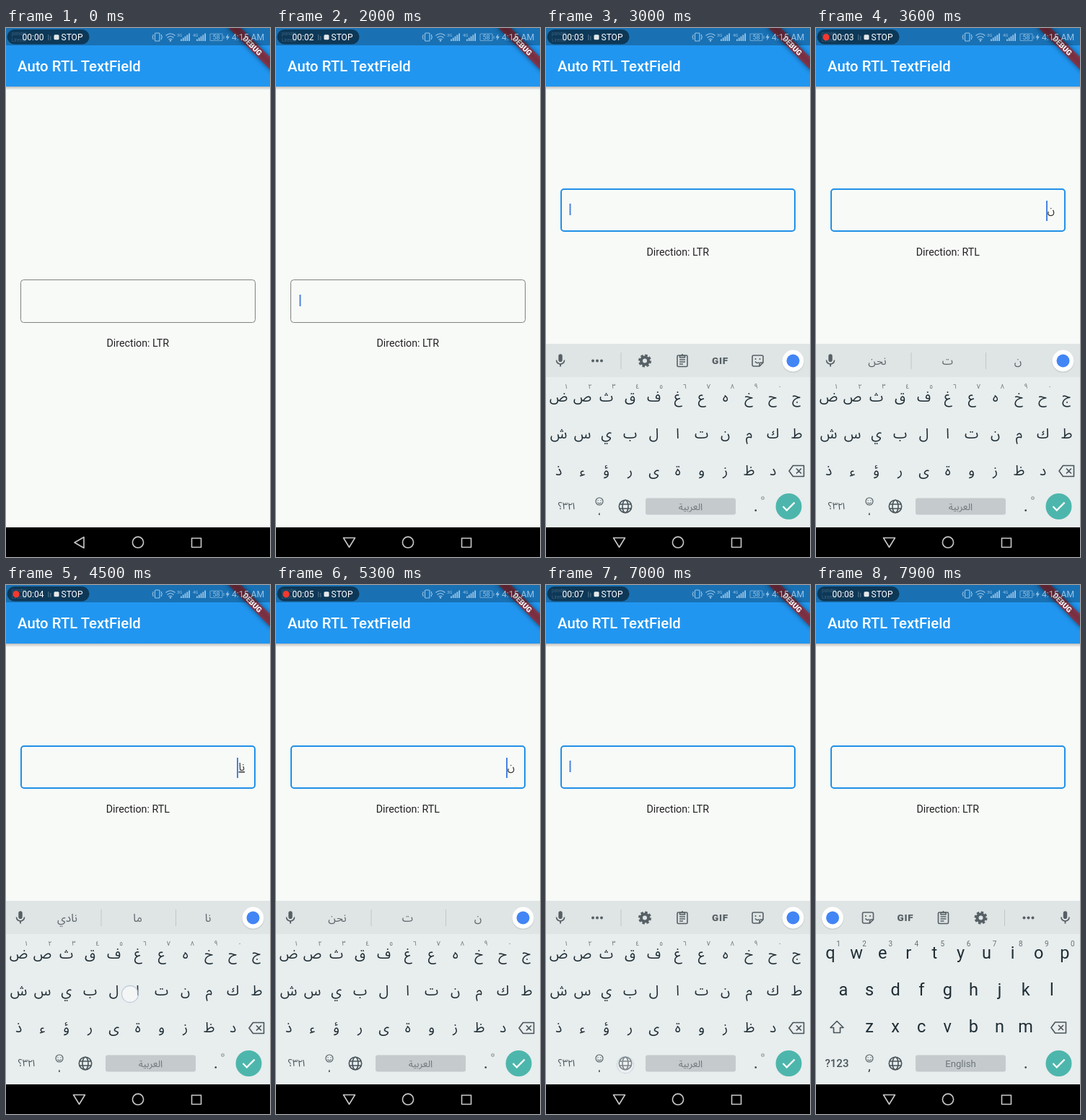
An HTML page for the animation above (8 s loop, 366 px wide and 732 px high).

```html
<!DOCTYPE html>
<html lang="en">
<head>
<meta charset="utf-8">
<title>Auto RTL TextField</title>
<style>
  html, body { margin: 0; width: 100%; height: 100%; overflow: hidden; background: #f8faf8; }
  svg { display: block; width: 100%; height: 100%; }
  text { font-family: Roboto, "Noto Sans Arabic", "DejaVu Sans", sans-serif; }
  .mid { text-anchor: middle; }
  .line { fill: none; stroke: currentColor; stroke-width: 1.6; stroke-linejoin: round; }
  .thin { stroke-width: 1.1; }
</style>
</head>
<body>
<svg viewBox="0 0 366 732">
  <defs>
    <filter id="blur" x="-30%" y="-200%" width="160%" height="500%"><feGaussianBlur stdDeviation="3.5"/></filter>
    <linearGradient id="shade" x2="0" y2="1">
      <stop stop-color="#000" stop-opacity=".24"/><stop offset="1" stop-color="#000" stop-opacity="0"/>
    </linearGradient>
  </defs>
  <rect width="366" height="732" fill="#f8faf8"/>

  <g id="form">
    <rect id="border" rx="4" fill="none"/>
    <text id="typed" x="331" y="383" font-size="15" text-anchor="end" text-decoration="underline" fill="#333"></text>
    <rect id="caret" width="2" fill="#4a82e0"/>
    <text id="direction" class="mid" x="182.8" y="441.4" font-size="14.25" fill="#212121"></text>
  </g>

  <g id="keyboard">
    <rect y="437" width="366" height="254" fill="#e8eded"/>
    <rect y="437" width="366" height="46" fill="#dfe4e4"/>
    <g id="strip" color="#566065"></g>
    <g id="keys" color="#47545a"></g>
    <rect x="138" y="650.5" width="125" height="23" rx="3" fill="#c5cacd"/>
    <text id="language" class="mid" x="200.5" y="666.6" font-size="13.2" fill="#6d767b"></text>
    <g color="#47545a">
      <g class="line">
        <circle cx="110" cy="662" r="8.7"/><ellipse cx="110" cy="662" rx="4" ry="8.7"/>
        <path d="M102 659H118M102 665H118"/>
      </g>
      <g class="line thin">
        <circle cx="74" cy="655" r="5"/><path d="M71.4 656.5Q74 659.5 76.6 656.5M72 653.2v1M76 653.2v1"/>
      </g>
    </g>
    <circle cx="290.7" cy="667.5" r="1.3" fill="#26343b"/>
    <circle cx="336.5" cy="662" r="18" fill="#4db6ac"/>
    <path d="M328.5 662l5.3 5.4 10.8-10.8" fill="none" stroke="#fff" stroke-width="2.2"/>
  </g>

  <circle id="touch" r="11.5" fill="#fff" fill-opacity=".65" stroke="#b4c3d8" stroke-width="1.3"/>

  <rect y="81" width="366" height="5" fill="url(#shade)"/>
  <rect width="366" height="81" fill="#2196f0"/>
  <text x="16" y="60" font-size="20.3" font-weight="500" fill="#fff">Auto RTL TextField</text>
  <g transform="translate(366 0) rotate(45) scale(1.0167)">
    <rect x="-44" y="28" width="88" height="12" opacity=".5" filter="url(#blur)"/>
    <rect x="-44" y="28" width="88" height="12" fill="#b71c1c" fill-opacity=".63"/>
    <text class="mid" y="37.7" font-size="10.2" font-weight="900" fill="#fff">DEBUG</text>
  </g>

  <rect width="366" height="24" opacity=".25"/>
  <g color="#bcd9f0" fill="#bcd9f0" opacity=".8">
    <g class="line thin">
      <rect x="206.5" y="7" width="6.5" height="11" rx="1"/>
      <path d="M204 9v2l-1 1.5 1 1.5v2M215.5 9v2l1 1.5-1 1.5v2"/>
      <path d="M221.5 10.5Q228 5 234.5 10.5M223.5 13.5Q228 9.5 232.5 13.5M225.5 16Q228 14 230.5 16"/>
      <g opacity=".65"><rect x="283" y="8" width="17" height="9.5" rx="1"/><path d="M302 11v4"/></g>
    </g>
    <circle cx="228" cy="17.5" r="1.2"/>
    <g id="signals"></g>
    <text x="286.5" y="16" font-size="9">58</text>
    <path d="M308 8l-3.5 5.5h2.3l-.8 4 3.8-5.7h-2.4z"/>
    <text x="313" y="17" font-size="12.2">4:15 AM</text>
  </g>
  <rect x="1.5" y="2" width="114" height="20.5" rx="10.2" fill="#0c3350" fill-opacity=".92"/>
  <g font-size="6.5" fill="#8aa3b8" opacity=".4">
    <text x="8" y="10">ponder</text><text x="8" y="19">Lirento</text>
    <path d="M58 9h1.5v8H58zM61 11h1.5v6H61z"/>
  </g>
  <circle id="record" cx="14" cy="12.7" r="4.7" fill="#f3392f"/>
  <text id="clock" x="22.5" y="17" font-size="12" fill="#fff"></text>
  <rect x="66.5" y="9.3" width="7" height="7" rx="1.5" fill="#e4e8ea"/>
  <text x="76.5" y="17" font-size="12" fill="#fff">STOP</text>

  <rect y="691" width="366" height="41"/>
  <g class="line" color="#c8c8c8">
    <path id="back"/><circle cx="183" cy="711.7" r="7.6"/><rect x="257.5" y="706" width="13" height="12.5"/>
  </g>
</svg>

<script>
const $ = id => document.getElementById(id);
const LOOP = 8000;
const time = { caret: 1750, slide: 2030, focus: 2050, lift: 2270, firstKey: 3270, secondKey: 4270,
               firstDelete: 5050, secondDelete: 5950, english: 7180 };

const label = (s, x, y, size, fill = '#1f2e36', extra = '') =>
  `<text class="mid" x="${x}" y="${y}" font-size="${size}" fill="${fill}" ${extra}>${s}</text>`;
const at = (x, y, body) => `<g transform="translate(${x} ${y})">${body}</g>`;
const divider = x => `<path d="M${x} 449v23" stroke="#c1c7c9"/>`;

const icons = {
  mic: `<path transform="translate(-10.8 -11) scale(.9)" fill="currentColor" d="M12 14c1.66 0 3-1.34 3-3V5a3 3 0 0 0-6 0v6c0 1.66 1.34 3 3 3zm5.3-3a5.3 5.3 0 0 1-10.6 0H5a7 7 0 0 0 6 6.92V21h2v-3.08A7 7 0 0 0 19 11z"/>`,
  dots: [-6, 0, 6].map(x => `<circle cx="${x}" r="2" fill="currentColor"/>`).join(''),
  gear: `<g fill="none" stroke="currentColor"><circle r="5" stroke-width="4"/>
    <circle r="7.5" stroke-width="3" stroke-dasharray="3.4 2.49"/></g>`,
  clipboard: `<g class="line"><rect x="-7" y="-7.5" width="14" height="15.5" rx="1.5"/>
    <path d="M-3.5-7h7v2.5h-7zM0-9.5v2M-4-1.5h8M-4 1.5h8M-4 4.5h5"/></g>`,
  gif: label('GIF', 0, 4.5, 13.5, 'currentColor', 'font-weight="900" letter-spacing=".8"'),
  sticker: `<path class="line" d="M-5.5-7.5h11a2 2 0 0 1 2 2v8l-5 5h-8a2 2 0 0 1-2-2v-11a2 2 0 0 1 2-2zM7.5 2.5h-3a2 2 0 0 0-2 2v3M-3.5 1Q-1 4.5 2 2M-3-3.5v2M3-3.5v2"/>`,
  search: `<circle cy="1" r="15.5" fill="#b8bec0" opacity=".5"/><circle r="15" fill="#fff"/><circle r="9" fill="#4285f4"/>`,
  backspace: `<path class="line" d="M-4.5-7.5H10.5v15H-4.5L-10 0zM0-3.5l7 7M7-3.5l-7 7"/>`,
  shift: `<path class="line" d="M0-8.5L9 .5H4.5v7h-9v-7H-9z"/>`,
};

function toolbar(flip) {
  const place = x => flip ? 365.5 - x : x;
  const slots = [['mic', 20], ['dots', 71], ['gear', 137], ['clipboard', 189],
                 ['gif', 241.5], ['sticker', 293.5], ['search', 342.5]];
  return divider(place(104)) + slots.map(([name, x]) => at(place(x), 460.5, icons[name])).join('');
}

function suggestions(words) {
  return at(20, 460.5, icons.mic) + at(342.5, 460.5, icons.search) + divider(132) + divider(235.5) +
    words.map((w, i) => label(w, 85 + 97.5 * i, 465.5, 15.5, '#5c676c')).join('');
}

const row = (letters, x, step, y, size, extra) =>
  [...letters].map((c, i) => label(c, x + step * i, y, size, undefined, extra)).join('');
const arabicRow = (letters, y) => row(letters, 17.6, 33, y, 19.5, 'font-weight="500"');

const arabicKeys =
  arabicRow('ضصثقفغعهخحج', 517) + arabicRow('شسيبلاتنمكط', 568) + arabicRow('ذءؤرىةوزظد', 619) +
  [...'١٢٣٤٥٦٧٨٩٠'].map((d, i) => label(d, 28 + 32.9 * i, 499, 9, '#667075')).join('') +
  at(347, 613, icons.backspace) +
  label('؟٣٢١', 28.5, 666, 13.3, '#47545a', 'style="direction:ltr;unicode-bidi:bidi-override"') +
  label('،', 74, 674, 14) + '<circle class="line thin" cx="300.5" cy="650.5" r="1.8" opacity=".6"/>';

const englishKeys =
  row('qwertyuiop', 20, 36.1, 517, 23.5) + row('asdfghjkl', 38, 36.1, 568, 23.5) +
  row('zxcvbnm', 74, 36.1, 619, 23.5) +
  [...'1234567890'].map((d, i) => label(d, 31 + 36.1 * i, 500, 10, '#667075')).join('') +
  at(29, 612, icons.shift) + at(336, 612.5, icons.backspace) +
  label('?123', 29, 667, 15, '#47545a', 'font-weight="500"') + label(',', 74, 672, 17);

const strips = {
  plain: toolbar(false), flipped: toolbar(true),
  'ن': suggestions(['نحن', 'ت', 'ن']),
  'نا': suggestions(['نادي', 'ما', 'نا']),
};

const touches = [
  { x: 120, y: 384, from: 1080, to: 1380 },
  { x: 248, y: 566, from: 3080, to: 3420 },
  { x: 172, y: 566, from: 4150, to: 4600 },
  { x: 349, y: 614, from: 4850, to: 5180 },
  { x: 350, y: 613, from: 5730, to: 6080 },
  { x: 110, y: 664, from: 6720, to: 7060 },
];

$('signals').innerHTML = [['3G', 237], ['4G', 259]].map(([name, x]) =>
  `<text x="${x}" y="11.5" font-size="6">${name}</text>` +
  [0, 1, 2, 3, 4].map(i => `<rect x="${x + 5 + i * 2.8}" y="${15.5 - i * 2}" width="1.8" height="${2.5 + i * 2}"/>`).join('')
).join('');

const shown = {};
function setMarkup(id, key, markup) {
  if (shown[id] !== key) $(id).innerHTML = markup;
  shown[id] = key;
}
const set = (id, attrs) => { for (const k in attrs) $(id).setAttribute(k, attrs[k]); };

function drawForm(t, text) {
  const focused = t >= time.focus, stroke = focused ? 2 : 1;
  set('form', { transform: `translate(0 ${t >= time.lift ? -126 : 0})` });
  set('border', {
    x: 20 + stroke / 2, y: 348 + stroke / 2, width: 326 - stroke, height: 60 - stroke,
    stroke: focused ? '#2190e8' : '#808280', 'stroke-width': stroke,
  });
  $('typed').textContent = text;
  $('direction').textContent = 'Direction: ' + (text ? 'RTL' : 'LTR');

  const lastEdit = [time.caret, time.firstKey, time.secondKey, time.firstDelete, time.secondDelete]
    .filter(e => e <= t).pop();
  set('caret', {
    opacity: +(t >= time.caret && (t - lastEdit) % 1000 < 500),
    x: text ? (text === 'ن' ? 319 : 320) : 32.5,
    y: text ? 365 : 369,
    height: text ? 28 : 16,
  });
}

function drawKeyboard(t, text) {
  const english = t >= time.english;
  const slide = Math.min(1, Math.max(0, (t - time.slide) / 150));
  set('keyboard', { transform: `translate(0 ${254 * (1 - slide) ** 2})`, visibility: slide ? 'visible' : 'hidden' });
  const strip = text || (english ? 'flipped' : 'plain');
  setMarkup('strip', strip, strips[strip]);
  setMarkup('keys', english, english ? englishKeys : arabicKeys);
  $('language').textContent = english ? 'English' : 'العربية';
}

function draw(t) {
  const text = t < time.firstKey || t >= time.secondDelete ? ''
    : t >= time.secondKey && t < time.firstDelete ? 'نا' : 'ن';
  drawForm(t, text);
  drawKeyboard(t, text);

  const touch = touches.find(p => t >= p.from && t < p.to);
  set('touch', touch
    ? { cx: touch.x, cy: touch.y, opacity: Math.min(1, (touch.to - t) / 130) }
    : { opacity: 0 });

  set('record', { opacity: +(t % 1000 >= 280 && t % 1000 < 780) });
  $('clock').textContent = '00:0' + Math.floor((t + 220) / 1000);
  set('back', { d: t < time.caret ? 'M95 712L108 704.5V719.5Z' : 'M93.5 705.5H109.5L101.5 718.5Z' });
}

function tick() {
  draw(performance.now() % LOOP);
  requestAnimationFrame(tick);
}
tick();
</script>
</body>
</html>
```
